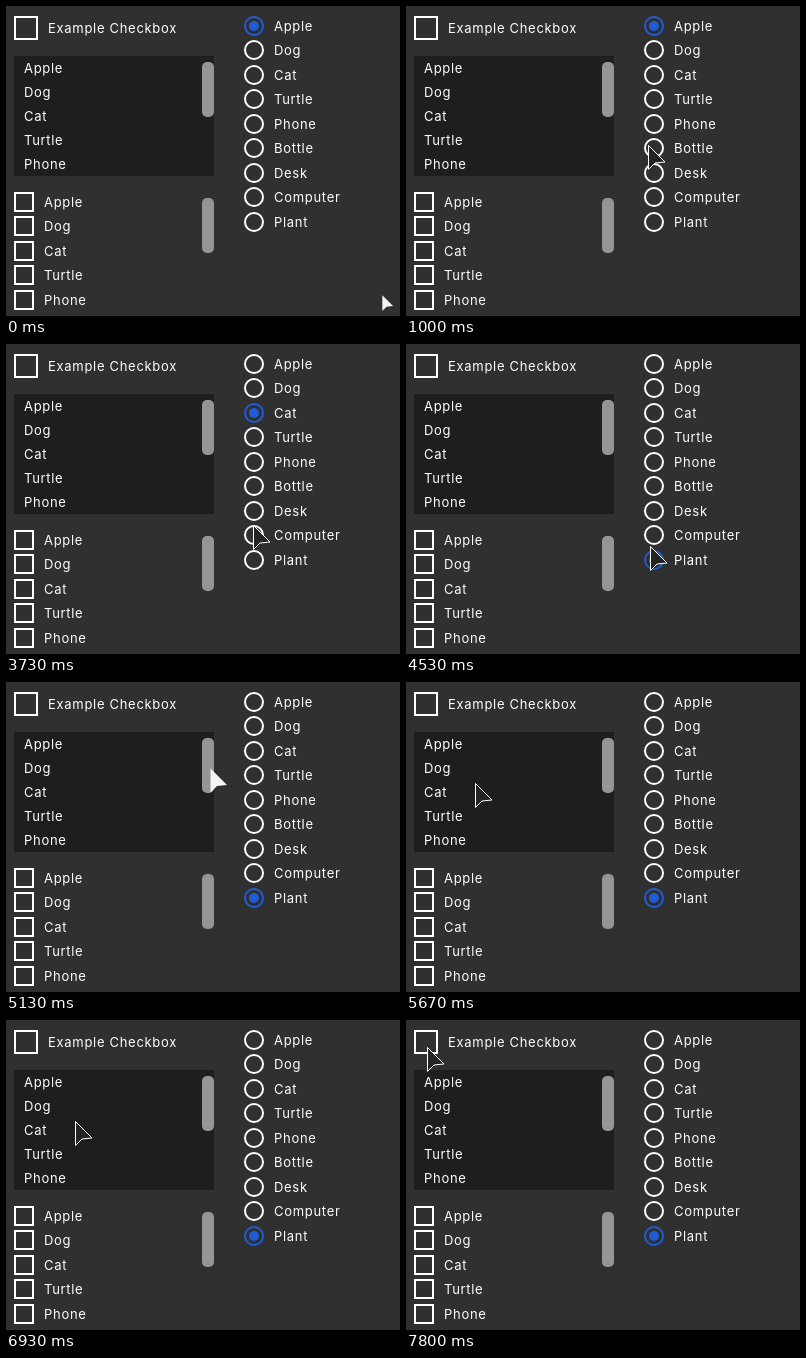
Write an HTML page with a canvas that moves like this. It is 394 px wide and 310 px high and loops after 8000 ms.

```html
<!DOCTYPE html>
<html lang="en">
<head>
<meta charset="utf-8">
<title>Widgets</title>
<style>
  html, body { margin: 0; width: 100%; height: 100%; overflow: hidden; background: #303030; }
  canvas { display: block; }
</style>
</head>
<body>
<canvas id="stage" width="394" height="310"></canvas>
<script>
const ctx = document.getElementById('stage').getContext('2d');
const LOOP = 8000, ROW = 24, BLUE = '#1f5cd6', WHITE = '#fff', BACK = '#303030';
const items = ['Apple', 'Dog', 'Cat', 'Turtle', 'Phone', 'Bottle', 'Desk', 'Computer', 'Plant'];

// Pointer moves: start, end, destination
const moves = [
  [70, 270, 315, 247], [470, 1200, 226, 115], [1400, 1600, 247, 119],
  [1800, 2070, 251, 144], [2410, 2670, 251, 69], [3070, 3700, 247, 181],
  [3820, 4130, 249, 217], [4370, 5130, 204, 86], [5140, 5670, 69, 101],
  [7070, 7800, 21, 27]
];
const clicks = [[0, 'Apple'], [1670, 'Phone'], [2330, 'Bottle'], [3070, 'Cat'], [4200, 'Plant']];

const clamp = (v, max = 1) => Math.min(max, Math.max(0, v));
const smooth = v => (v = clamp(v), v * v * (3 - 2 * v));
const spacedRow = (y, i) => Math.floor(y + 24.5 * i);

function pointerAt(t) {
  let x = 376, y = 289;
  for (const [start, end, toX, toY] of moves) {
    const u = smooth((t - start) / (end - start));
    x += (toX - x) * u;
    y += (toY - y) * u;
  }
  return [Math.round(x), Math.round(y)];
}

// Four wheel notches down, then one sweep back to the top
function scrolledRows(t) {
  const notch = clamp((t - 5750) / 160, 4);
  const whole = Math.floor(notch);
  const down = whole + smooth((notch - whole) * 2 - 1);
  return down - 4 * smooth((t - 6450) / 480);
}

function label(text, x, y) {
  ctx.fillStyle = WHITE;
  ctx.fillText(text, x, y + 1.5);
}

function box(x, y, size) {
  ctx.strokeStyle = WHITE;
  ctx.lineWidth = 2;
  ctx.strokeRect(x + 1, y + 1, size - 2, size - 2);
}

function thumb(y) {
  ctx.fillStyle = '#959595';
  ctx.beginPath();
  ctx.roundRect(196, y, 12, 55, 5);
  ctx.fill();
}

function radio(y, on) {
  ctx.strokeStyle = ctx.fillStyle = on ? BLUE : WHITE;
  ctx.lineWidth = 2;
  ctx.beginPath();
  ctx.arc(248, y, 9, 0, 7);
  ctx.stroke();
  if (!on) return;
  ctx.beginPath();
  ctx.arc(248, y, 5, 0, 7);
  ctx.fill();
}

function list(rows) {
  ctx.save();
  ctx.beginPath();
  ctx.rect(8, 50, 200, 5 * ROW);
  ctx.clip();
  ctx.fillStyle = '#1e1e1e';
  ctx.fill();
  items.forEach((text, i) => label(text, 18, 62 + ROW * (i - rows)));
  ctx.restore();
  thumb(56 + Math.round(13 * rows));
}

function arrow(x, y, hover, scale) {
  ctx.save();
  ctx.translate(x, y);
  ctx.scale(scale, scale);
  ctx.beginPath();
  for (const p of [[.5, .5], [.5, 24.5], [7, 18], [17, 17]]) ctx.lineTo(...p);
  ctx.closePath();
  ctx.fillStyle = hover ? '#242424' : '#f4f4f4';
  ctx.fill();
  ctx.strokeStyle = WHITE;
  ctx.lineWidth = 1;
  if (hover) ctx.stroke();
  ctx.restore();
}

function draw(t) {
  ctx.fillStyle = BACK;
  ctx.fillRect(0, 0, 394, 310);
  ctx.font = '13px Inter, "Open Sans", sans-serif';
  ctx.letterSpacing = '0.7px';
  ctx.textBaseline = 'middle';

  box(8, 10, 24);
  label('Example Checkbox', 42, 22);
  list(scrolledRows(t));

  items.slice(0, 5).forEach((text, i) => {
    const y = spacedRow(196, i);
    box(8, y - 10, 20);
    label(text, 38, y);
  });
  thumb(192);

  const picked = clicks.findLast(c => c[0] <= t)[1];
  items.forEach((text, i) => {
    const y = spacedRow(20, i);
    radio(y, text === picked);
    label(text, 268, y);
  });

  const [x, y] = pointerAt(t);
  const overRadios = x >= 238 && x < 336 && y < 228;
  const overLeft = x >= 8 && x < 196;
  arrow(x, y, overRadios || overLeft, t < 70 ? .65 : 1);
}

const start = performance.now();
function tick() {
  draw((performance.now() - start) % LOOP);
  requestAnimationFrame(tick);
}
tick();
</script>
</body>
</html>
```
